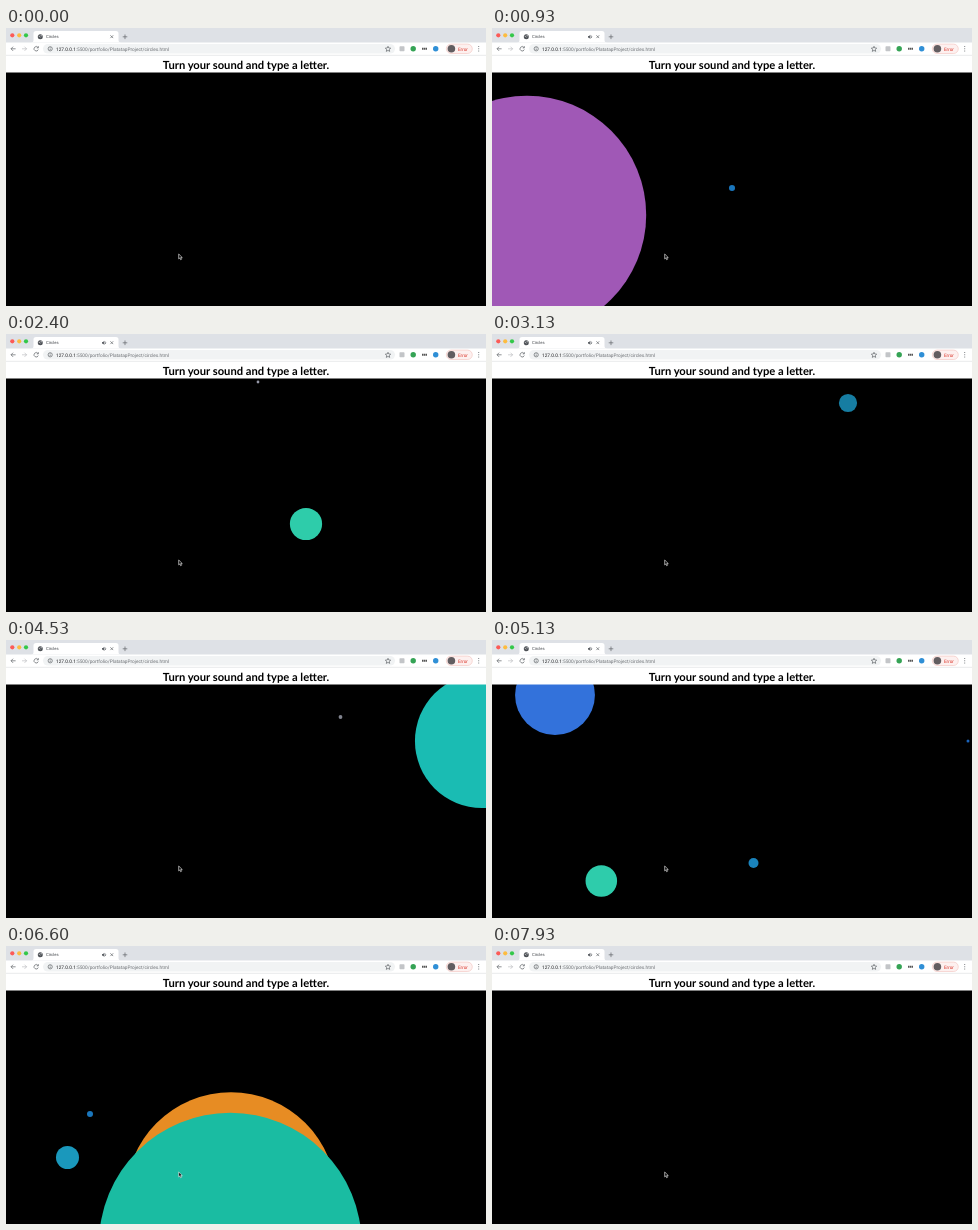
Recreate the animation shown at these times as an HTML page. Size 480x278 px, loop 8 s.

```html
<!DOCTYPE html>
<html lang="en">
<head>
<meta charset="utf-8">
<title>Circles</title>
<style>
  html, body { margin: 0; width: 100%; height: 100%; overflow: hidden; background: #000; }
  svg { display: block; width: 100vw; height: 100vh; }
  text { font-family: Roboto, sans-serif; text-rendering: geometricPrecision; }
  .title { font: 700 11.2px Lato, sans-serif; }
  .icon { fill: none; stroke: #5f6368; stroke-width: .7; }
</style>
</head>
<body>
<svg viewBox="0 0 480 278" preserveAspectRatio="none">
  <rect width="480" height="278"/>
  <g id="circles"></g>

  <rect width="480" height="44.5" fill="#fff"/>
  <text class="title" x="240" y="41.2" text-anchor="middle">Turn your sound and type a letter.</text>

  <!-- tab strip -->
  <rect width="480" height="14.5" fill="#dee1e6"/>
  <circle cx="6.3" cy="7.3" r="2.1" fill="#fc5b57"/>
  <circle cx="13.2" cy="7.3" r="2.1" fill="#fdbc40"/>
  <circle cx="20" cy="7.3" r="2.1" fill="#34c84a"/>
  <path d="M25 14.5q2.5 0 2.5-2.5V5.5q0-2.5 2.5-2.5h80q2.5 0 2.5 2.5V12q0 2.5 2.5 2.5z" fill="#fff"/>
  <circle cx="34.3" cy="8.8" r="2.5" fill="#4d5156"/>
  <path d="M32.6 8q1.5.2 1.7 1.4M34.5 7q.5 1 1.6 1" stroke="#fff" stroke-width=".6" fill="none"/>
  <text x="40" y="10.3" font-size="4.2" fill="#45494d">Circles</text>
  <g id="speaker">
    <path d="M96 8h1l1.4-1.3v4.2L97 9.7h-1z" fill="#5f6368"/>
    <path class="icon" d="M99.3 7.6q.9 1.2 0 2.4" stroke-width=".5"/>
  </g>
  <path class="icon" d="M104.4 7.3l2.8 2.8m0-2.8l-2.8 2.8M116.7 8.8h4.6m-2.3-2.3v4.6"/>

  <!-- toolbar -->
  <path class="icon" d="M9.6 20.8H5m2.1-2.1L5 20.8l2.1 2.1"/>
  <path class="icon" d="M16 20.8h4.6m-2.1-2.1l2.1 2.1l-2.1 2.1" stroke-opacity=".4"/>
  <path class="icon" d="M32 19.5a2.2 2.2 0 1 0 .3 2M32.4 18.2v1.7h-1.7"/>
  <rect x="37" y="16" width="352" height="9.6" rx="4.8" fill="#f1f3f4"/>
  <circle class="icon" cx="44.2" cy="20.8" r="2.1" stroke-width=".5"/>
  <path class="icon" d="M44.2 20.5v1.5m0-2.6v.6" stroke-width=".6"/>
  <text x="50" y="22.5" font-size="4.77" fill="#6b6f73"><tspan fill="#202124">127.0.0.1</tspan>:5500/portfolio/PlatatapProject/circles.html</text>
  <path class="icon" d="M382 18.3l.8 1.7l1.9.2l-1.4 1.3l.4 1.9l-1.7-1l-1.7 1l.4-1.9l-1.4-1.3l1.9-.2z" stroke-width=".5"/>
  <rect x="393.5" y="18.3" width="5" height="5" rx=".7" fill="#c3c5c8"/>
  <circle cx="407.2" cy="20.8" r="2.7" fill="#35a355"/>
  <path d="M416 20.8h5" stroke="#555" stroke-width="2" stroke-dasharray="1.4 .4"/>
  <circle cx="429.7" cy="20.8" r="2.7" fill="#2f8fd6"/>
  <rect x="440.3" y="16.1" width="26" height="9.4" rx="4.7" fill="#fdf0ef" stroke="#efb6b1" stroke-width=".5"/>
  <circle cx="445.4" cy="20.8" r="3.8" fill="#625d60"/>
  <text x="452" y="22.5" font-size="4.6" fill="#d93025">Error</text>
  <path d="M472.7 18.6v.01m0 2.2v.01m0 2.2v.01" stroke="#5f6368" stroke-width="1" stroke-linecap="round"/>
  <path d="M0 27.3h480" stroke="#d8dadd" stroke-width=".6"/>

  <!-- pointer -->
  <path d="M172.7 226v4.9l1.1-1l.8 1.8l.9-.4l-.8-1.7h1.6z" stroke="#fff" stroke-width=".6"/>
</svg>
<script>
const LOOP = 8000, FPS = 15, START_RADIUS = 167, SHRINK = 0.9, TICKS = 60;
const HELD_STEPS = new Set([9, 18, 30, 39, 48, 66, 84, 108]);

// Base colours as hue, saturation, lightness; the hue turns one degree per tick.
const turquoise = [168, 76, 42], sea = [168, 76, 36], emerald = [145, 63, 49],
      blue = [204, 70, 53], purple = [283, 39, 53], carrot = [28, 80, 52],
      red = [6, 78, 57], silver = [184, 9, 62], slate = [184, 6, 53];

// Key presses: time in seconds, centre, colour.
const presses = [
  [0.300, 240, 160, turquoise],
  [0.880, 35, 187, purple],
  [1.210, 388, 115, red],
  [1.641, 252, 48, silver],
  [2.030, 300, 190, emerald],
  [2.673, 356, 69, sea],
  [3.300, 110, 200, blue],
  [3.825, 334.5, 77, slate],
  [4.389, 476, 101, turquoise],
  [4.578, 261.5, 223, turquoise],
  [4.760, 109.3, 241, emerald],
  [4.907, 63, 55, blue],
  [5.300, 330, 120, carrot],
  [5.965, 84, 168, turquoise],
  [6.177, 61.5, 211.5, turquoise],
  [6.527, 225, 251.5, carrot],
  [6.562, 224.3, 298, turquoise],
  [6.800, 330, 170, emerald],
];

const layer = document.getElementById("circles");
const speaker = document.getElementById("speaker");

const circles = presses.map(([start, x, y, color]) => {
  const node = document.createElementNS("http://www.w3.org/2000/svg", "circle");
  node.setAttribute("cx", x);
  node.setAttribute("cy", y);
  layer.append(node);
  return { node, start, color };
});

function draw(ms) {
  let step = Math.min(Math.floor((ms + 4) * FPS / 1000), LOOP * FPS / 1000 - 1);
  if (HELD_STEPS.has(step)) step--;
  const time = step / FPS;
  speaker.setAttribute("visibility", step >= 5 ? "visible" : "hidden");
  for (const { node, start, color: [h, s, l] } of circles) {
    const age = (time - start) * TICKS;
    const radius = age < 0 ? 0 : START_RADIUS * SHRINK ** age;
    node.setAttribute("r", radius < 0.4 ? 0 : radius);
    node.setAttribute("fill", `hsl(${h + age}, ${s}%, ${l}%)`);
  }
}

const origin = performance.now();
function tick() {
  draw((performance.now() - origin) % LOOP);
  requestAnimationFrame(tick);
}
tick();
</script>
</body>
</html>
```
